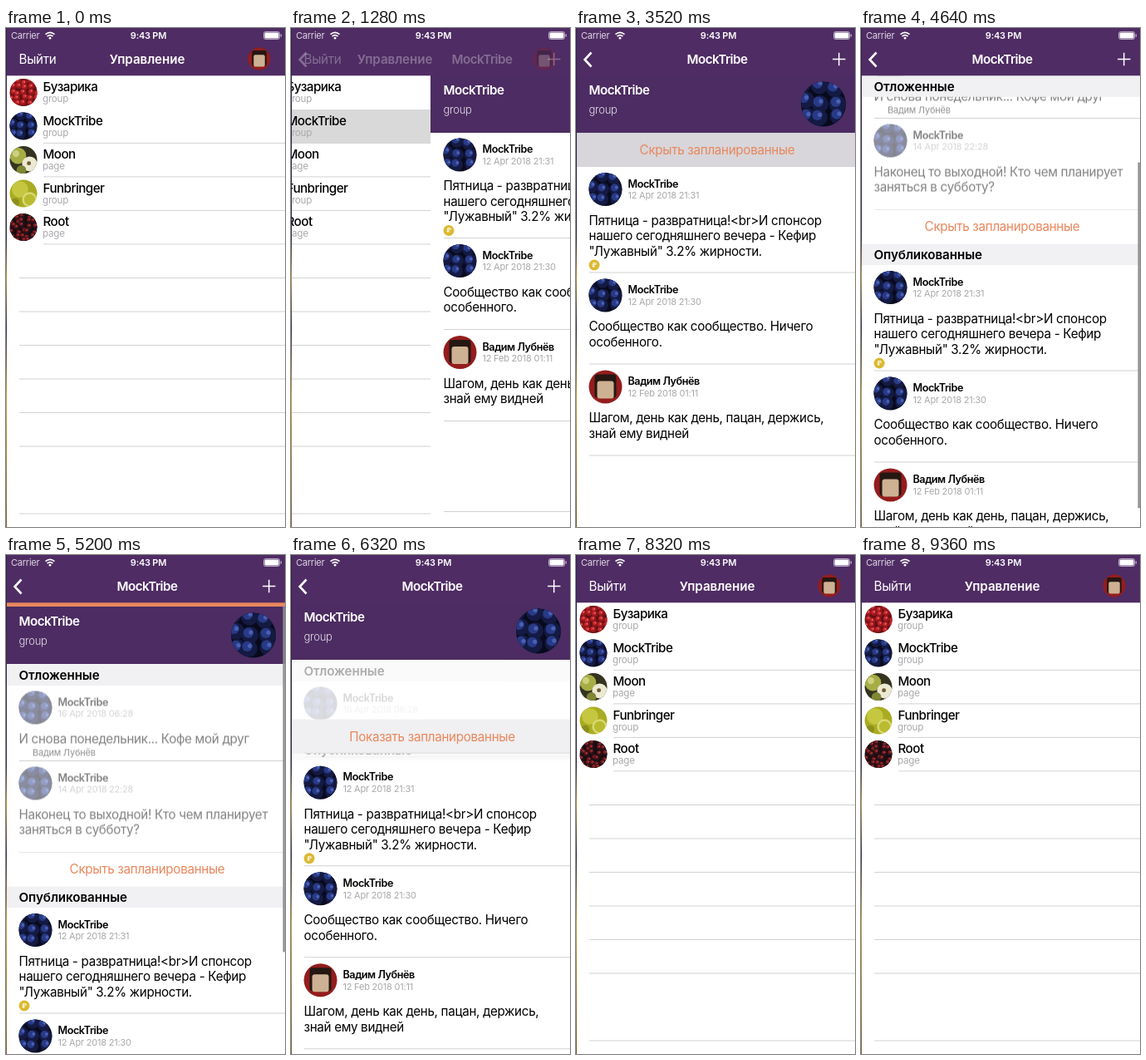
Recreate the animation shown at these times as an HTML page. Size 336 by 600 pixels, loop 9440 ms.

```html
<!DOCTYPE html>
<html lang="ru">
<head>
<meta charset="utf-8">
<title>Управление</title>
<style>
  html, body { margin: 0; width: 100%; height: 100%; overflow: hidden; background: #fff; }
  svg { display: block; width: 100vw; height: 100vh; }
  text { font-family: Inter, Roboto, sans-serif; letter-spacing: -.02em; white-space: pre; }
  .tight { letter-spacing: -.035em; }
  .loose { letter-spacing: -.005em; }
</style>
</head>
<body>
<svg id="stage" viewBox="0 0 336 600" preserveAspectRatio="none"></svg>
<script>
const LOOP = 9440, STEP = 80;
const PURPLE = '#4f2c64', ORANGE = '#e8875c', GREY = '#a9a9ad', LINE = '#d2d2d4';
const GROUP = 'MockTribe', PERSON = 'Вадим Лубнёв';

// --- markup helpers; text is placed by the vertical centre of its capitals ---
const esc = s => s.replace(/&/g, '&amp;').replace(/</g, '&lt;');
const text = (s, x, cy, size, o = {}) =>
  `<text x="${x}" y="${cy + size * .36}" font-size="${size}" font-weight="${o.weight || 400}"
    fill="${o.fill || '#000'}" text-anchor="${o.anchor || 'start'}" class="${o.cls || ''}">${esc(s)}</text>`;
const rect = (x, y, w, h, fill, extra = '') =>
  `<rect x="${x}" y="${y}" width="${w}" height="${h}" fill="${fill}" ${extra}/>`;
const circle = (x, y, r, fill) => `<circle cx="${x}" cy="${y}" r="${r}" fill="${fill}"/>`;
const line = (x, y) => rect(x, y - .5, 336 - x, 1, LINE);
const group = (id, body, extra = '') => `<g id="${id}" ${extra}>${body}</g>`;
const avatar = (id, x, y, r) =>
  `<use href="#${id}" x="${x - r}" y="${y - r}" width="${2 * r}" height="${2 * r}"/>`;

// --- avatars ---
function random(seed) {
  return () => (seed = (seed * 16807) % 2147483647) / 2147483647;
}
function berries(base, tones, seed, size) {
  const rnd = random(seed);
  let out = circle(0, 0, 21, base);
  for (let y = -16; y <= 20; y += size * 1.7)
    for (let x = -17; x <= 20; x += size * 1.9) {
      const cx = x + rnd() * 5 - 2, cy = y + rnd() * 5 - 2;
      out += circle(cx, cy, size, tones[0]) +
        circle(cx - size * .2, cy - size * .25, size * .6, tones[1]) +
        circle(cx + size * .1, cy - size * .3, size * .25, tones[2]);
    }
  return out;
}
const symbol = (id, body) =>
  `<symbol id="${id}" viewBox="-20 -20 40 40"><g clip-path="url(#round)">${body}</g></symbol>`;
const defs = `<defs>
  <clipPath id="round"><circle r="20"/></clipPath>
  <clipPath id="below"><rect y="57" width="336" height="543"/></clipPath>
  <linearGradient id="edge" x2="0" y2="1">
    <stop offset="0" stop-color="#2c2148"/><stop offset=".42" stop-color="#33304a"/>
    <stop offset=".5" stop-color="#b8923c"/><stop offset=".6" stop-color="#34324e"/>
    <stop offset=".74" stop-color="#c79f3a"/><stop offset="1" stop-color="#7d6230"/>
  </linearGradient>
  ${symbol('blue', berries('#080a1c', ['#141a42', '#283a86', '#4a60b4'], 77, 7.6))}
  ${symbol('red', berries('#5c1013', ['#94171c', '#c9282d', '#e8706c'], 31, 4.6))}
  ${symbol('dark', berries('#160d12', ['#2a1118', '#7c1a1e', '#b8433c'], 19, 4.2))}
  ${symbol('apple', circle(0, 0, 21, '#34331f') + circle(-8, -6, 12, '#a6ad45') + circle(-11, -9, 5, '#cdd07c')
    + circle(9, 6, 11, '#ece9d2') + circle(-3, 15, 7, '#7f8634') + circle(8, 5, 3, '#6d5a30'))}
  ${symbol('lime', circle(0, 0, 21, '#a9ac22') + circle(-5, -6, 12, '#c6c740') + circle(9, 9, 11, '#d9d873')
    + circle(9, 9, 8, '#b9bb30') + circle(-12, 13, 6, '#8b8f1b'))}
  ${symbol('person', circle(0, 0, 21, '#941d1d') + rect(-13, -15, 26, 28, '#251712', 'rx="3"')
    + rect(-10, -7, 20, 21, '#cdb192', 'rx="3"'))}
</defs>`;

// --- list screen ---
const rows = [
  ['Бузарика', 'group', 'red'], [GROUP, 'group', 'blue'], ['Moon', 'page', 'apple'],
  ['Funbringer', 'group', 'lime'], ['Root', 'page', 'dark']
];
const listScreen = rect(0, 57, 336, 543, '#fff') +
  rect(0, 98, 336, 40, '#d9d9d9', 'id="tap" opacity="0"') +
  rows.map(([name, kind, pic], i) => {
    const y = 57 + 40.5 * i;
    return avatar(pic, 21, y + 20.5, 16.5) +
      text(name, 44.5, y + 14, 15.2, { weight: 500, cls: 'tight' }) +
      text(kind, 44, y + 28, 11.6, { fill: GREY }) + (i ? line(45, y + 40.9) : '');
  }).join('') +
  [0, 1, 2, 3, 4, 5, 7].map(i => line(16, 300.5 + 40.5 * i)).join('');

// --- detail screen ---
function post(y, who, date, lines, pic) {
  return avatar(pic, 35.5, y + 27.5, 20) +
    text(who, 62.5, y + 20.5, 12.6, { weight: 600, cls: 'tight' }) +
    text(date, 62.5, y + 35, 11, { fill: GREY }) +
    lines.map((s, i) => text(s, 15.5, y + 65 + 18.5 * i, 15.2)).join('');
}
const section = s =>
  rect(0, 0, 336, 25.5, '#f1f0f2') + text(s, 15.5, 13, 15.2, { weight: 600, cls: 'loose' });

const scheduled =
  group('', post(-.5, GROUP, '16 Apr 2018 06:28', ['И снова понедельник... Кофе мой друг'], 'blue') +
    text(PERSON, 32, 81.5, 11, { fill: '#222' }) +
    post(90.5, GROUP, '14 Apr 2018 22:28', ['Наконец то выходной! Кто чем планирует', 'заняться в субботу?'], 'blue'),
    'opacity=".5"') + line(16, 91) + line(16, 201);

const published = rect(0, 0, 336, 620, '#fff') +
  post(0, GROUP, '12 Apr 2018 21:31',
    ['Пятница - развратница!<br>И спонсор', 'нашего сегодняшнего вечера - Кефир', '"Лужавный" 3.2% жирности.'], 'blue') +
  circle(22, 118.5, 6.5, '#dcb930') +
  text('₽', 22, 118.5, 8, { fill: '#fff', weight: 600, anchor: 'middle' }) +
  post(127.5, GROUP, '12 Apr 2018 21:30', ['Сообщество как сообщество. Ничего', 'особенного.'], 'blue') +
  post(237.5, PERSON, '12 Feb 2018 01:11', ['Шагом, день как день, пацан, держись,', 'знай ему видней'], 'person') +
  [127.5, 237.5, 347.5, 456.5].map(y => line(16, y)).join('');

const toggle = { fill: ORANGE, anchor: 'middle' };
const toggleRow = rect(0, 0, 336, 41, '#fff') + rect(0, 0, 336, 41, '#d8d6da', 'id="press" opacity="0"') +
  group('show', text('Показать запланированные', 170, 20.5, 15.2, toggle)) +
  group('hide', text('Скрыть запланированные', 170, 20.5, 15.2, toggle)) +
  group('rowLine', line(16, 40.5));

const profile = rect(0, 0, 336, 69, '#4c2c62') +
  text(GROUP, 15.5, 17.5, 15.2, { weight: 600, fill: '#fff', cls: 'tight' }) +
  text('group', 15.5, 41.5, 13, { weight: 300, fill: '#e6dfea' }) + avatar('blue', 298, 34.5, 27);

const detailScreen = rect(0, 57, 336, 543, '#fff') +
  group('scheduled', scheduled) + group('published', published) +
  group('sectionB', section('Опубликованные')) + group('row', toggleRow) +
  group('profile', profile) + group('sectionA', section('Отложенные')) +
  rect(0, 57, 336, 5, ORANGE, 'id="bar"') +
  rect(333.5, 0, 2.3, 416, '#8c8c90', 'id="thumb" rx="1.1"');

// --- bars ---
const white = { fill: '#fff' };
const navTitle = { fill: '#fff', weight: 600, anchor: 'middle', cls: 'tight' };
const statusBar = text('Carrier', 6, 9, 11, { fill: '#ded6e3' }) +
  text('9:43 PM', 171.5, 9, 11, { ...white, weight: 600, anchor: 'middle' }) +
  `<g fill="none" stroke="#fff" stroke-width="1.7"><path d="M47.5 7.6q5.5-4.6 11 0M49.6 10q3.4-2.8 6.8 0"/></g>` +
  circle(53, 12.2, 1.4, '#fff') +
  rect(310.5, 4.5, 19, 9, 'none', 'rx="2" stroke="#b9a9c4"') +
  rect(311.5, 5.5, 17, 7, '#fff', 'rx="1"') + rect(330.6, 7.3, 1.4, 3.4, '#b9a9c4', 'rx=".7"');
const navList = group('listTitle', text('Управление', 170, 38, 15.2, { ...navTitle, cls: 'loose' })) +
  text('Выйти', 15.5, 38, 15.2, white) + avatar('person', 305, 37, 13.5);
const navDetail = group('detailTitle', text(GROUP, 170, 38, 15.2, navTitle)) +
  `<path d="M18.5 29.5L10.5 38L18.5 46.5" fill="none" stroke="#fff" stroke-width="2.6"/>
   <path d="M309 37.5H324.5M316.7 29.8V45.2" stroke="#fff" stroke-width="1.5"/>`;

document.getElementById('stage').innerHTML = defs +
  group('content', group('list', listScreen) + group('detail', detailScreen), 'clip-path="url(#below)"') +
  rect(0, 0, 336, 57.3, PURPLE) + statusBar + group('navList', navList) + group('navDetail', navDetail) +
  rect(0, 0, 1, 600, 'url(#edge)');

// --- motion ---
const ui = {};
document.querySelectorAll('#stage [id]').forEach(el => ui[el.id] = el);
const mix = (a, b, k) => a + (b - a) * k;
const smooth = k => k * k * (3 - 2 * k);
const move = (el, x, y) => el.setAttribute('transform', `translate(${x} ${y})`);
const fade = (el, k) => el.setAttribute('opacity', Math.max(0, Math.min(1, k)));

// Eased value through [time, value] keys
function track(t, keys) {
  if (t <= keys[0][0]) return keys[0][1];
  for (let i = 1; i < keys.length; i++) {
    const [t0, a] = keys[i - 1], [t1, b] = keys[i];
    if (t <= t1) return mix(a, b, smooth((t - t0) / (t1 - t0)));
  }
  return keys[keys.length - 1][1];
}

function draw(t) {
  const push = track(t, [[1080, 0], [1480, 1], [7920, 1], [8320, 0]]);
  const reveal = track(t, [[1840, 0], [2160, 1]]);
  const open = track(t, [[3560, 0], [3880, 1], [6120, 1], [6440, 0]]);
  const scroll = track(t, [[4000, 0], [4520, 134], [4720, 134], [5120, 0]]);
  const gap = track(t, [[1360, 0], [1480, 5], [1680, 5], [1760, 1.5], [1840, 0],
    [5040, 0], [5160, 5], [5600, 5], [5760, 0]]);
  const press = track(t, [[3400, 0], [3440, 1], [3600, 1], [3880, 0], [6000, 0], [6040, 1], [6160, 1], [6440, 0]]);
  const hiding = t >= 3440 && t < 6080;

  move(ui.list, -100 * push, 0);
  move(ui.detail, 336 * (1 - push), 0);
  fade(ui.tap, track(t, [[960, 0], [1040, 1], [1480, 1], [1481, 0], [7919, 0], [7920, 1], [8320, 0]]));
  fade(ui.navList, 1 - 1.4 * push);
  fade(ui.navDetail, 1.4 * push - .4);
  move(ui.listTitle, -90 * push, 0);
  move(ui.detailTitle, 120 * (1 - push), 0);

  const top = (t > 4000 ? gap : 0) - scroll;
  const rowY = mix(126, 352.5, open) + top;
  const postsY = mix(125 + 41.5 * reveal, 418.5, open) + top;
  move(ui.profile, 0, 57 + gap - scroll);
  move(ui.scheduled, 0, 151.5 + top);
  move(ui.row, 0, rowY);
  move(ui.published, 0, postsY);
  move(ui.sectionB, 0, postsY - 25);
  move(ui.sectionA, 0, Math.max(57.3, 126.5 + top));
  fade(ui.scheduled, open);
  fade(ui.sectionA, open);
  fade(ui.sectionB, open);
  fade(ui.row, reveal);
  fade(ui.rowLine, 1 - open);
  fade(ui.press, press);
  fade(ui.show, hiding ? 0 : 1);
  fade(ui.hide, hiding ? 1 : 0);

  ui.bar.setAttribute('height', gap);
  fade(ui.bar, (gap - 1.5) / 2);
  ui.thumb.setAttribute('y', 59 + scroll * 127 / 166 + (t > 4000 ? gap * .5 : 0));
  fade(ui.thumb, track(t, [[3960, 0], [4080, 1], [5440, 1], [5680, 0]]));
}

function tick() {
  draw(Math.floor(performance.now() % LOOP / STEP) * STEP);
  requestAnimationFrame(tick);
}
tick();
</script>
</body>
</html>
```
